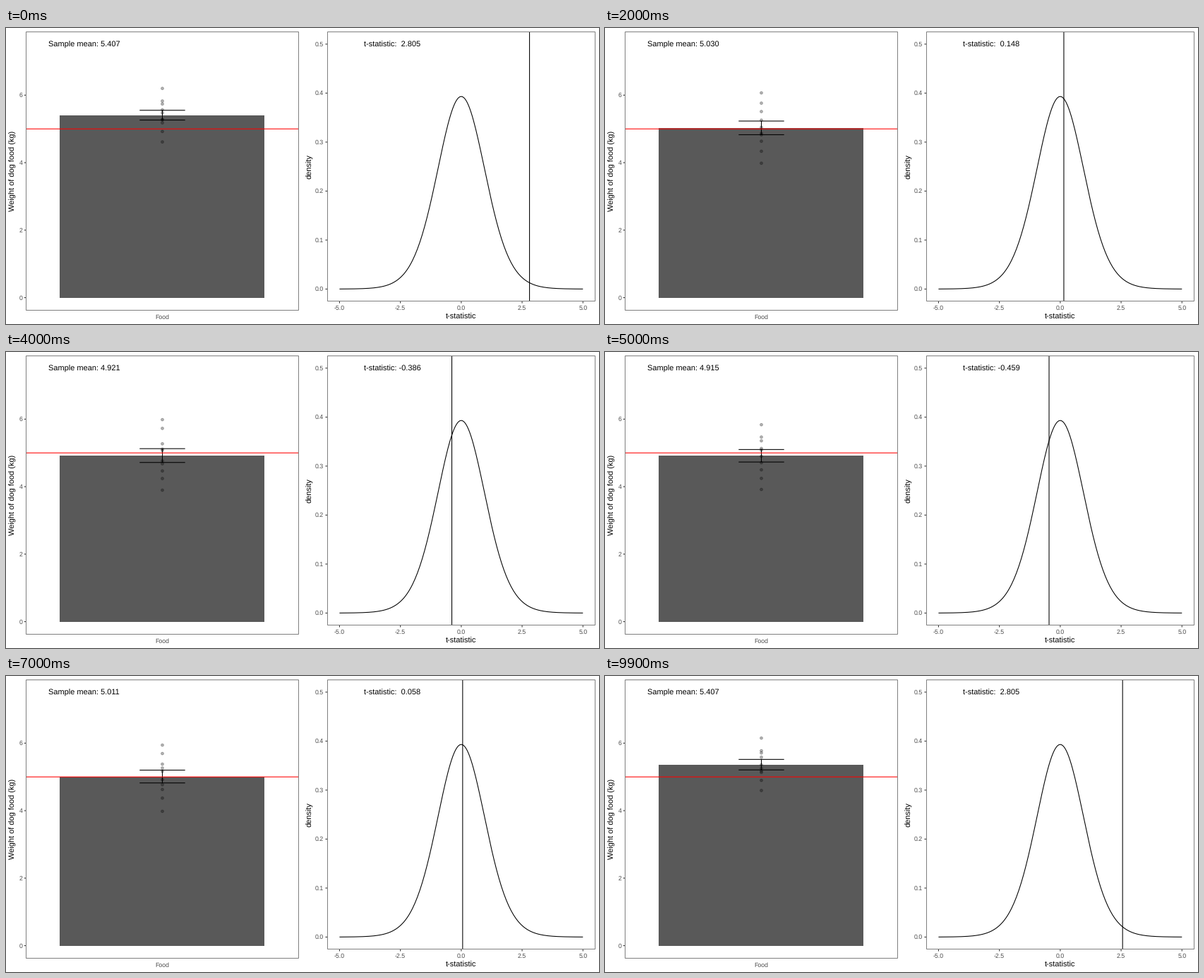
A matplotlib script for the animation above (10000 ms loop, 840 px wide and 420 px high).

```python
import numpy as np
import matplotlib.pyplot as plt
from math import floor, gamma, pi, sqrt
from matplotlib.animation import FuncAnimation
from matplotlib.patches import Circle, Rectangle

W, H, DPI = 840, 420, 72
FRAMES, INTERVAL, PER_STATE, MOVE = 100, 100, 10, 6
N, DF, MU = 10, 17, 5
TEXT, TICK, BORDER, BAR = "#4d4d4d", "#333333", "#7f7f7f", "#595959"
LW = 1.07

plt.rcParams["font.family"] = "Liberation Sans"
plt.rcParams["text.hinting"] = "none"

# Mean and t-statistic of each sample
MEANS = [5.407, 4.949, 5.030, 4.838, 4.921, 4.915, 4.805, 5.011, 5.022, 4.750]
TSTATS = [2.805, -0.351, 0.148, -0.913, -0.386, -0.459, -0.692, 0.058, 0.075, -0.830]

rng = np.random.default_rng(4)


def sample(mean, sem):
    """Normal-looking weights in random order with this mean and error."""
    p = (np.arange(N) + 0.5) / N
    z = 4.91 * (p ** 0.14 - (1 - p) ** 0.14)  # approximate normal quantiles
    z = rng.permutation(z + rng.normal(0, 0.1, N))
    z = (z - z.mean()) / z.std(ddof=1)
    return mean + z * sem * sqrt(N)


def state(mean, t):
    sem = (mean - MU) / t
    return np.array([mean, sem, t, *sample(mean, sem)])


STATES = [state(m, t) for m, t in zip(MEANS, TSTATS)]

# Panels as left, top, right, bottom in pixels
LEFT = (28.5, 5.5, 414.5, 400.55)
RIGHT = (455.2, 5.5, 834.5, 387.8)
MID = 221.5


def scale(start, end, lo, hi):
    """Map lo..hi to start..end with a margin of 5 percent on both sides."""
    unit = (end - start) / (hi - lo) / 1.1
    return lambda v: (start + end) / 2 + (v - (lo + hi) / 2) * unit


weight_y = scale(LEFT[3], LEFT[1], 0, 7.5)
density_y = scale(RIGHT[3], RIGHT[1], 0, 0.5)
t_x = scale(RIGHT[0], RIGHT[2], -5, 5)

fig = plt.figure(figsize=(W / DPI, H / DPI), dpi=DPI, facecolor="white")
ax = fig.add_axes([0, 0, 1, 1])
ax.set_xlim(0, W)
ax.set_ylim(H, 0)
ax.axis("off")


def line(xs, ys, color="black", z=3):
    art, = ax.plot(xs, ys, color=color, lw=LW, zorder=z,
                   solid_capstyle="butt", snap=False)
    return art


def label(x, y, text, size=11, color="black", ha="left", rot=0):
    return ax.text(x, y, text, fontsize=size, color=color, ha=ha,
                   va="baseline", rotation=rot, rotation_mode="anchor")


def panel(box):
    x0, y0, x1, y1 = (floor(v) + 0.5 for v in box)
    ax.add_patch(Rectangle((x0, y0), x1 - x0, y1 - y0, fill=False,
                           ec=BORDER, lw=1, zorder=6, snap=False))


def y_tick(x, y, text):
    line([x - 2.75, x], [y, y], TICK)
    label(x - 5, round(y + 3), text, 8.8, TEXT, "right")


def x_tick(x, y, text):
    line([x, x], [y, y + 2.75], TICK)
    label(x, 400, text, 8.8, TEXT, "center")


panel(LEFT)
panel(RIGHT)
for v in range(0, 7, 2):
    y_tick(LEFT[0], weight_y(v), str(v))
for d in np.arange(6) / 10:
    y_tick(RIGHT[0], density_y(d), f"{d:.1f}")
for t in np.linspace(-5, 5, 5):
    x_tick(t_x(t), RIGHT[3], f"{t:.1f}")
label(MID, 413, "Food", 8.8, TEXT, "center")
label(13, 203, "Weight of dog food (kg)", ha="center", rot=90)
label(433, 196.5, "density", ha="center", rot=90)
label(645, 413, "t-statistic", ha="center")

# Student t density
ts = np.linspace(-5, 5, 201)
peak = gamma((DF + 1) / 2) / (sqrt(DF * pi) * gamma(DF / 2))
line(t_x(ts), density_y(peak * (1 + ts ** 2 / DF) ** (-(DF + 1) / 2)))

# Moving parts
bar = ax.add_patch(Rectangle((76, 0), 290, 1, fc=BAR, lw=0, zorder=1))
dots = [ax.add_patch(Circle((MID, 0), 1.95, fc="black", ec="black",
                            lw=0.71, alpha=0.3, zorder=2)) for _ in range(N)]
whisker = line([], [])
line([LEFT[0], LEFT[2]], [weight_y(MU)] * 2, "red", 4)
marker = line([], [])
mean_text = label(60, 27, "")
t_text = label(507, 27, "")


def pose(i):
    """Sample index, next index and eased progress at frame i."""
    k, step = divmod(i, PER_STATE)
    moving = MOVE + (k == 0)  # the first move takes one frame more
    p = max(0, step - (PER_STATE - moving)) / moving
    return k, (k + 1) % len(STATES), (1 - np.cos(pi * p)) / 2


def draw(i):
    a, b, e = pose(i)
    mean, sem, t, *weights = (1 - e) * STATES[a] + e * STATES[b]
    top, base = round(weight_y(mean)), round(weight_y(0))
    bar.set_y(top)
    bar.set_height(base - top)
    for dot, w in zip(dots, weights):
        dot.center = (MID, weight_y(w))
    hi, lo = weight_y(mean + sem), weight_y(mean - sem)
    x0, x1 = MID - 32.2, MID + 32.2
    whisker.set_data([x0, x1, np.nan, MID, MID, np.nan, x0, x1],
                     [hi, hi, np.nan, hi, lo, np.nan, lo, lo])
    marker.set_data([t_x(t)] * 2, [RIGHT[1], RIGHT[3]])
    k = b if e > 0.5 - 1e-9 else a
    mean_text.set_text(f"Sample mean: {MEANS[k]:.3f}")
    t_text.set_text(f"t-statistic: {TSTATS[k]: .3f}")
    return [bar, whisker, marker, mean_text, t_text, *dots]


anim = FuncAnimation(fig, draw, frames=FRAMES, interval=INTERVAL,
                     init_func=lambda: draw(0), repeat=True, repeat_delay=0)
plt.show()
```
